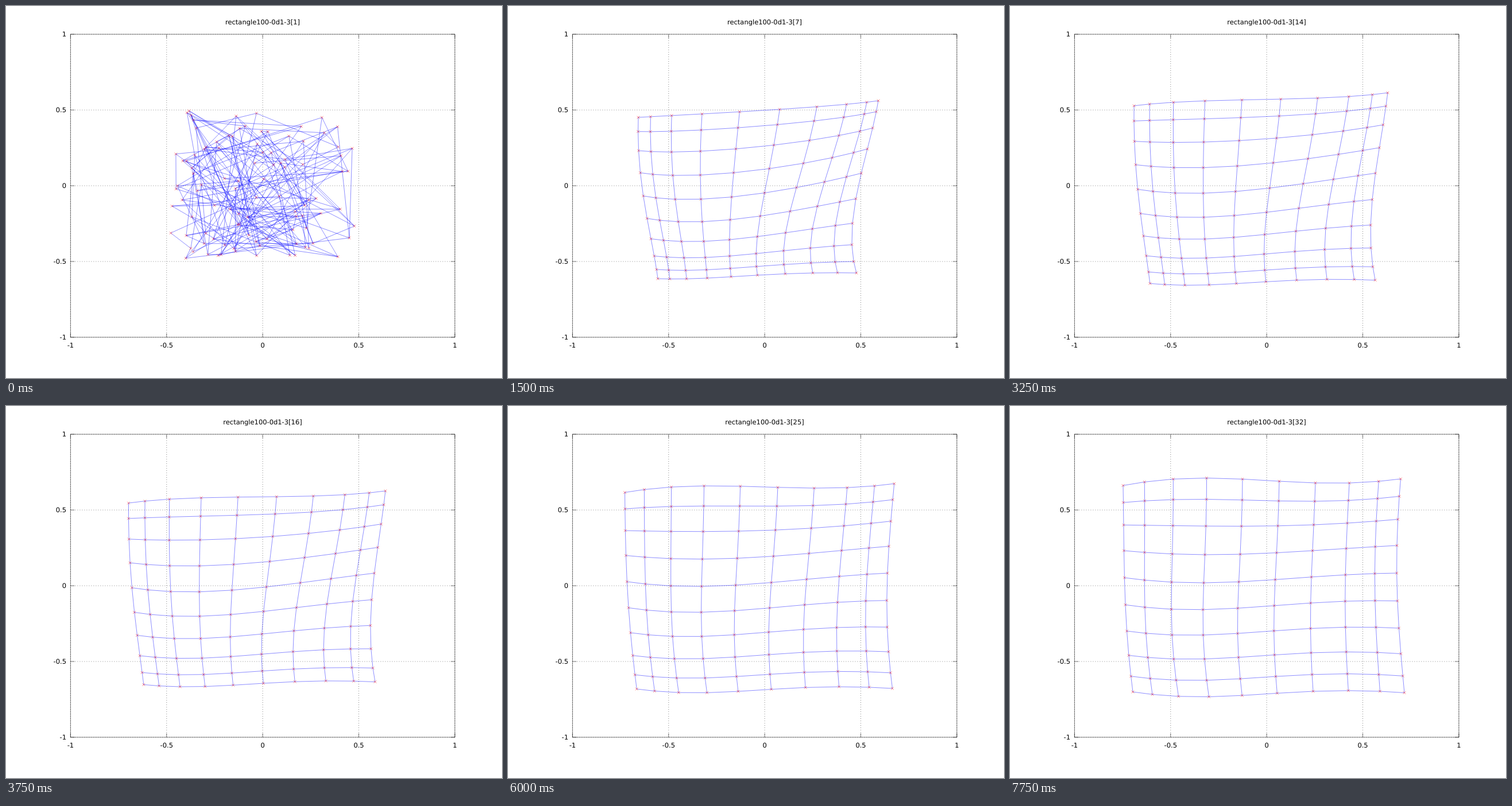
Write an HTML page that moves like this. It is 864 px wide and 648 px high and loops after 8 s.

```html
<!DOCTYPE html>
<html lang="en">
<head>
<meta charset="utf-8">
<title>Mesh relaxation</title>
<style>
html, body { margin: 0; width: 100%; height: 100%; overflow: hidden; background: #fff; }
svg { display: block; width: 864px; height: 648px; }
path { fill: none; stroke-width: .5; }
#axes { stroke: #000; }
#dots { stroke: #000; stroke-dasharray: 1 3; }
#mesh { stroke: #00f; stroke-width: .45; }
#marks { stroke: #f00; }
text { font: 11.5px "DejaVu Sans", sans-serif; text-rendering: geometricPrecision; text-anchor: middle; }
.y { text-anchor: end; }
</style>
</head>
<body>
<svg viewBox="0 0 864 648">
  <path id="dots"/>
  <path id="axes"/>
  <path id="mesh"/>
  <path id="marks"/>
  <g id="labels"></g>
  <text id="title" x="447" y="32"></text>
</svg>
<script>
const $ = id => document.getElementById(id);
const SIZE = 10, STEPS = 32, STEP_MS = 250;
const FIRST = 7, LAST = STEPS;
const BOX = { l: 112.4, r: 781.9, t: 49.2, b: 577 };

function drawAxes() {
  const { l, r, t, b } = BOX;
  let dots = '', axes = `M${l} ${t}H${r}V${b}H${l}Z`, labels = '';
  for (let k = 0; k < 5; k++) {
    const x = l + (r - l) * k / 4, y = b + (t - b) * k / 4, name = k / 2 - 1;
    dots += `M${x} ${b}V${t}M${l} ${y}H${r}`;
    axes += `M${x} ${b}v-7M${x} ${t}v7M${l} ${y}h7M${r} ${y}h-7`;
    labels += `<text x="${x}" y="595">${name}</text><text class="y" x="105" y="${y + 4}">${name}</text>`;
  }
  $('dots').setAttribute('d', dots);
  $('axes').setAttribute('d', axes);
  $('labels').innerHTML = labels;
}

// Cubic through every third node; the sine draws nodes together at the rim.
const warp = i => Math.sin(.26 * (i - 4.5));
const KNOTS = [0, 3, 6, 9];
const WEIGHTS = Array.from({ length: SIZE }, (_, i) => KNOTS.map(k =>
  KNOTS.reduce((p, m) => m === k ? p : p * (warp(i) - warp(m)) / (warp(k) - warp(m)), 1)));

const mix = (weights, values) => weights.reduce((sum, w, i) => sum + w * values[i], 0);
const surface = net => WEIGHTS.flatMap(wr => WEIGHTS.map(wc =>
  [0, 1].map(axis => mix(wr, net.map(row => mix(wc, row.map(p => p[axis])))))));

const early = surface([
  [[227, 194], [338, 188], [538, 175.5], [645, 165]],
  [[230.5, 290.5], [335, 294.5], [514.5, 274], [626, 249]],
  [[249, 405.5], [341, 410], [483.5, 395], [600, 378.5]],
  [[261, 475], [347, 474], [483, 466.5], [607, 465]]
]);
const late = surface([
  [[197, 138.5], [342.5, 125.5], [532, 134], [680.5, 127]],
  [[198.5, 252], [339.5, 259], [527, 252], [674, 243]],
  [[203.5, 392], [336.5, 399], [523.5, 387.5], [677.5, 387]],
  [[214, 498], [346.5, 506.5], [528, 497], [687, 499.5]]
]);

let seed = 29;
const random = () => (seed = (seed * 16807) % 2147483647) / 2147483647;
const scatter = early.map(() => [287 + 325 * random(), 182 + 262 * random()]);

// The spread slows with the square root of the step.
function nodesAt(step) {
  if (step === 1) return scatter;
  const f = (Math.sqrt(step) - Math.sqrt(FIRST)) / (Math.sqrt(LAST) - Math.sqrt(FIRST));
  return early.map((p, i) => p.map((v, axis) => v + f * (late[i][axis] - v)));
}

function draw(step) {
  const points = nodesAt(step);
  let mesh = '', marks = '';
  points.forEach(([x, y], i) => {
    if (i % SIZE < SIZE - 1) mesh += `M${x} ${y}L${points[i + 1]}`;
    if (i + SIZE < points.length) mesh += `M${x} ${y}L${points[i + SIZE]}`;
    marks += `M${x - 2.3} ${y - 2.3}l4.6 4.6m0-4.6l-4.6 4.6`;
  });
  $('mesh').setAttribute('d', mesh);
  $('marks').setAttribute('d', marks);
  $('title').textContent = `rectangle100-0d1-3[${step}]`;
}

let shown = 0;
function tick() {
  const step = Math.floor(performance.now() / STEP_MS) % STEPS + 1;
  if (step !== shown) draw(shown = step);
  requestAnimationFrame(tick);
}

drawAxes();
tick();
</script>
</body>
</html>
```
